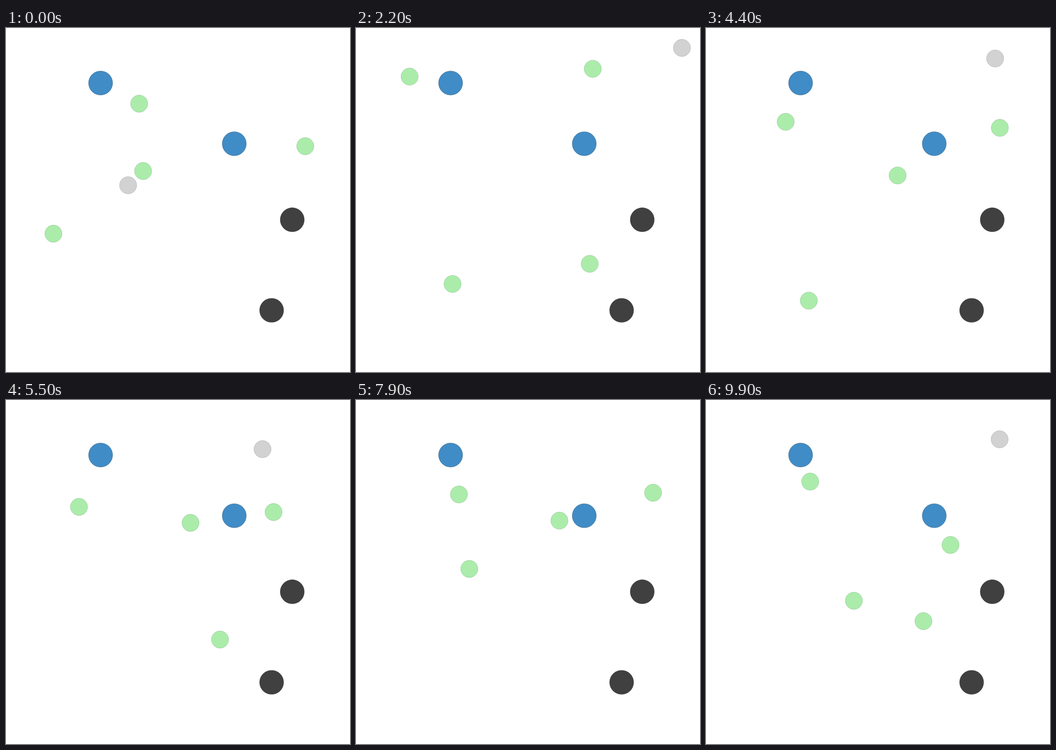
An HTML page that plays this animation: 700 px wide and 700 px high, repeating every 10000 ms.

```html
<!DOCTYPE html>
<html lang="en">
<head>
<meta charset="utf-8">
<title>Roaming agents</title>
<style>
  html, body { margin: 0; width: 100%; height: 100%; overflow: hidden; background: #fff; }
  svg { display: block; width: 100vw; height: 100vh; }
  .food { fill: #408cc6; stroke: #204663; }
  .rock { fill: #404040; stroke: #202020; }
  .chaser { fill: #59d959; stroke: #2d6c2d; }
  .runner { fill: #a6a6a6; stroke: #535353; }
  .food, .rock { stroke-opacity: .5; }
  .chaser, .runner { fill-opacity: .5; stroke-opacity: .25; }
</style>
</head>
<body>
<svg viewBox="0 0 700 700"></svg>
<script>
const STEP = 100, STEPS = 100, CENTRE = 350, SIDES = 30, SWING = 0.012;
const KEYS = [0, 12, 33, 55, 71, 88, 99];
const svg = document.querySelector('svg');

// Discs are 30-sided polygons around the origin.
function addDisc(kind, radius) {
  const disc = document.createElementNS(svg.namespaceURI, 'polygon');
  const corners = Array.from({ length: SIDES }, (_, i) => {
    const a = 2 * Math.PI * i / SIDES;
    return [radius * Math.cos(a), radius * Math.sin(a)];
  });
  disc.setAttribute('points', corners.join(' '));
  disc.setAttribute('class', kind);
  svg.append(disc);
  return disc;
}

function place(disc, x, y) {
  disc.setAttribute('transform', `translate(${x} ${y})`);
}

function addAgent(kind, xs, ys) {
  return { disc: addDisc(kind, 17.5), xs, ys };
}

// Speed at a key, taken from its neighbours.
function speed(values, i) {
  const a = Math.max(0, i - 1), b = Math.min(KEYS.length - 1, i + 1);
  return (values[b] - values[a]) / (KEYS[b] - KEYS[a]);
}

// Smooth curve through the keys that swings outwards between them.
function position(values, step) {
  const i = Math.max(1, KEYS.findIndex(k => k >= step));
  const span = KEYS[i] - KEYS[i - 1];
  const u = (step - KEYS[i - 1]) / span, v = 1 - u;
  const p = values[i - 1] * (1 + 2 * u) * v * v + values[i] * (1 + 2 * v) * u * u
    + span * u * v * (speed(values, i - 1) * v - speed(values, i) * u);
  return p + (p - CENTRE) * SWING * span * Math.sin(Math.PI * u);
}

place(addDisc('food', 24.5), 192.5, 112);
place(addDisc('food', 24.5), 464.5, 235.5);
place(addDisc('rock', 24.5), 582.5, 390.2);
place(addDisc('rock', 24.5), 540.5, 574.5);

// Where each agent is at the keys: x, then y.
const agents = [
  addAgent('chaser', [271, 84, 253.5, 148.5, 305.5, 134.5, 212],
                     [154, 91.5, 220, 217.5, 257.5, 166, 166]),
  addAgent('chaser', [609, 502.5, 410, 375.5, 452, 355, 497.5],
                     [240.5, 461, 392, 250, 351, 162.5, 295]),
  addAgent('chaser', [279, 364.5, 536.5, 544.5, 617.5, 477.5, 442.5],
                     [291, 94.5, 215.5, 228, 166, 308, 450]),
  addAgent('chaser', [96.5, 373, 71.5, 435.5, 332.5, 185.5, 301],
                     [418.5, 443, 523.5, 487.5, 472.5, 222, 408.5]),
  addAgent('runner', [248.5, 581.5, 559, 522, 533, 545, 597.5],
                     [320, 103, 135, 100, 67, 24, 80]),
];

function draw() {
  const step = Math.floor(performance.now() / STEP) % STEPS;
  for (const { disc, xs, ys } of agents) {
    place(disc, position(xs, step), position(ys, step));
  }
  requestAnimationFrame(draw);
}
draw();
</script>
</body>
</html>
```
